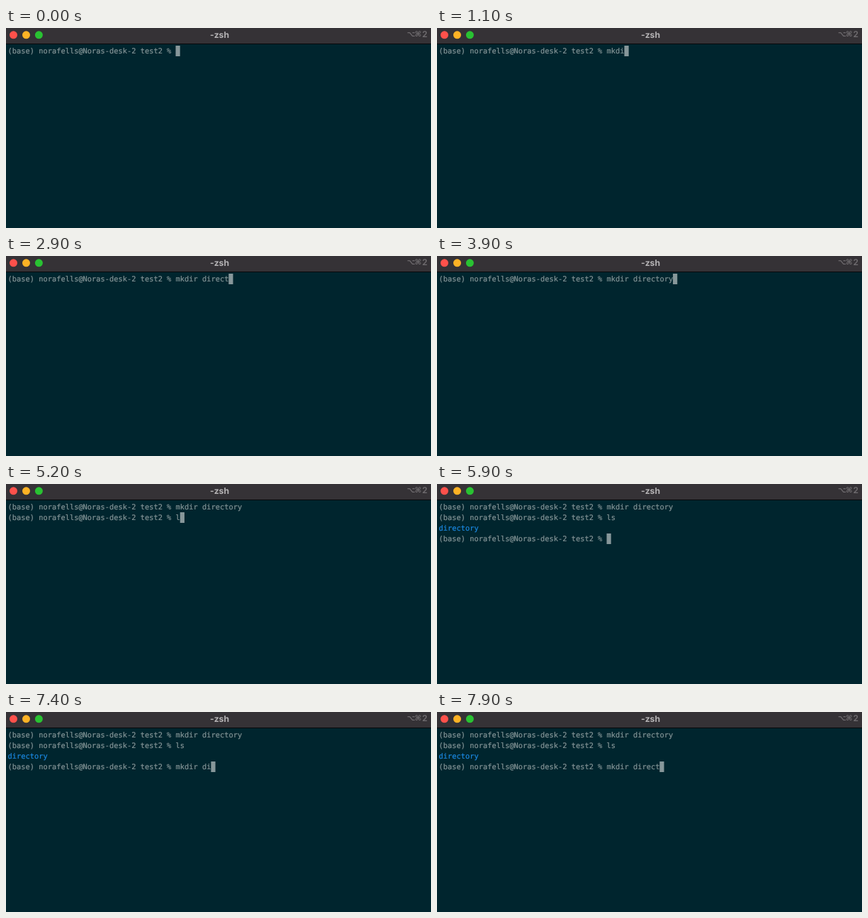
Animation, 600 px wide and 283 px high, one loop 8000 ms. Source, as an HTML page:

```html
<!DOCTYPE html>
<html lang="en">
<head>
<meta charset="utf-8">
<title>Terminal</title>
<style>
  html, body { margin: 0; width: 100%; height: 100%; overflow: hidden; background: #00252e; }
  svg { display: block; width: 100%; height: 100%; }
  text { text-rendering: geometricPrecision; white-space: pre; }
  #lines { font: 10.36px "DejaVu Sans Mono", monospace; color: #849496; }
  #lines text { fill: currentColor; stroke: currentColor; stroke-width: .2px; }
  #lines .folder { color: #1b88e0; }
  .title { font: bold 12.2px Inter, sans-serif; fill: #b5b3b5; }
  .keys { font: 12px Inter, sans-serif; font-weight: 600; fill: #706d70; }
  .keys .symbol { font: bold 10.3px "DejaVu Sans", sans-serif; }
</style>
</head>
<body>
<svg viewBox="0 0 600 283">
  <rect width="600" height="22" fill="#353236"/>
  <rect y="22" width="600" height="1" fill="#05080b"/>
  <circle cx="10.5" cy="9.8" r="5.5" fill="#ff514b"/>
  <circle cx="28.5" cy="9.8" r="5.5" fill="#fdb225"/>
  <circle cx="46.4" cy="9.8" r="5.5" fill="#29c232"/>
  <text class="title" x="301.5" y="13.5" text-anchor="middle">-zsh</text>
  <g class="keys">
    <text class="symbol" x="566" y="12.3">⌥</text>
    <text class="symbol" x="577" y="12.3">⌘</text>
    <text x="587.5" y="13">2</text>
  </g>
  <g id="lines"></g>
  <rect id="cursor" width="6.2" height="15" fill="#87979a"/>
</svg>
<script>
const LOOP = 8000, PITCH = 6.237, ROW = 15, LEFT = 2.6;
const PROMPT = "(base) norafells@Noras-desk-2 test2 % ";
const cursor = document.getElementById("cursor");

// One key time (in units of 100 ms) per typed character.
const commands = [
  { start: 0, row: 0, text: "mkdir directory",
    keys: [8, 9, 10, 11, 13, 14, 18, 22, 25, 26, 28, 29, 37, 38, 39] },
  { start: 45, row: 1, text: "ls", keys: [52, 53] },
  { start: 56, row: 3, text: "mkdir direct",
    keys: [66, 67, 68, 69, 71, 72, 73, 74, 76, 77, 78, 79] }
];

function addLine(row) {
  const line = document.createElementNS("http://www.w3.org/2000/svg", "text");
  line.setAttribute("x", LEFT);
  line.setAttribute("y", 36.2 + row * ROW);
  return document.getElementById("lines").appendChild(line);
}

for (const c of commands) c.line = addLine(c.row);
const output = addLine(2);
output.setAttribute("class", "folder");

function draw(now) {
  const tick = now % LOOP / 100;
  for (const c of commands) {
    const shown = tick >= c.start;
    const typed = c.keys.filter(k => k <= tick).length;
    c.line.textContent = shown ? PROMPT + c.text.slice(0, typed) : "";
    if (shown) {
      cursor.setAttribute("x", LEFT - 0.1 + (PROMPT.length + typed) * PITCH);
      cursor.setAttribute("y", 25 + c.row * ROW);
    }
  }
  output.textContent = tick >= 56 ? "directory" : "";
}

const begin = performance.now();
function frame() {
  draw(performance.now() - begin);
  requestAnimationFrame(frame);
}
frame();
</script>
</body>
</html>
```
